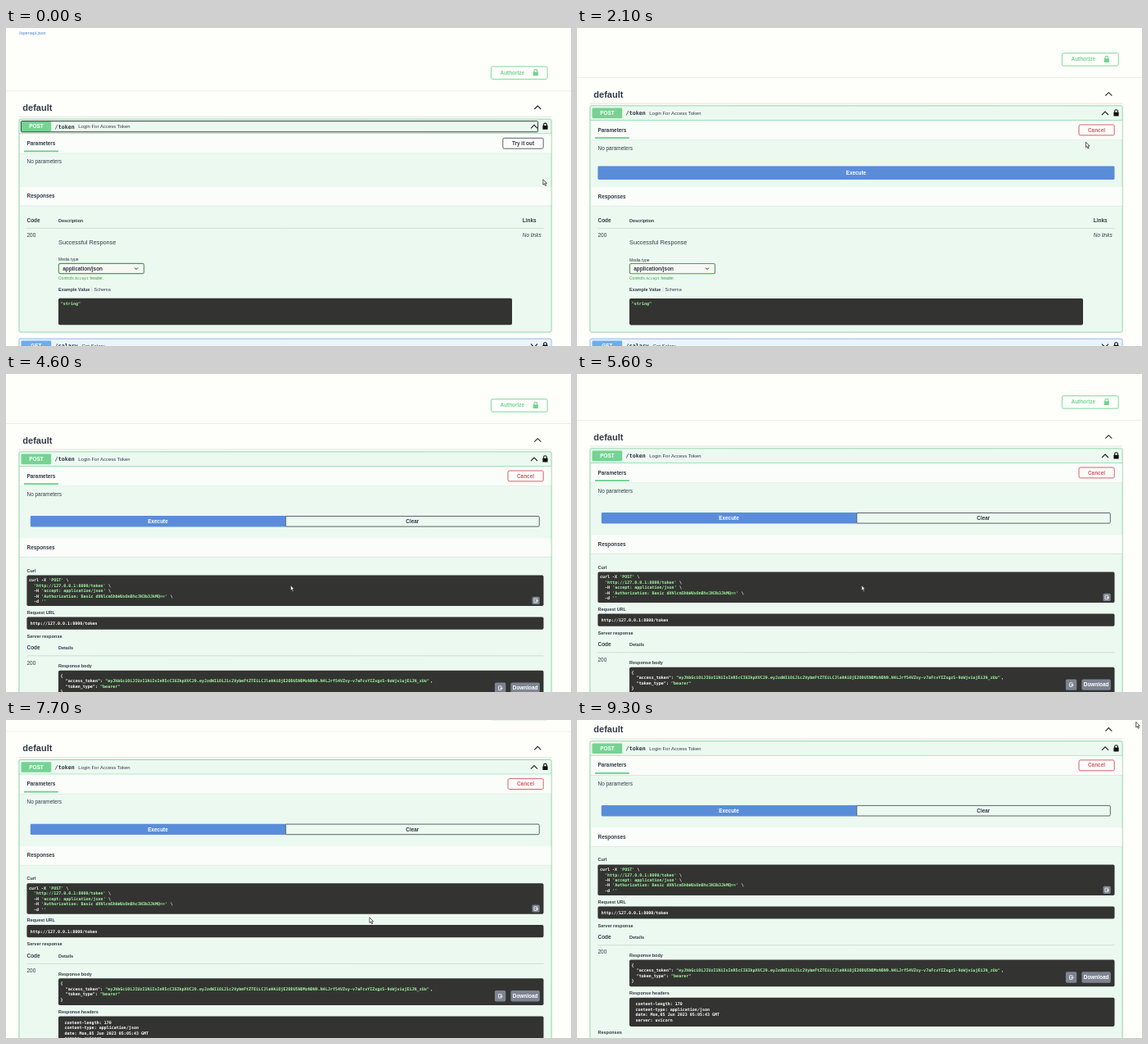
Write an HTML page with a canvas that moves like this. It is 690x388 px and loops after 9600 ms.

```html
<!DOCTYPE html>
<html lang="en">
<head>
<meta charset="utf-8">
<title>API docs</title>
<style>
html, body { margin: 0; width: 100%; height: 100%; overflow: hidden; background: #fefefb; }
canvas { display: block; width: 690px; height: 388px; }
</style>
</head>
<body>
<canvas id="stage" width="690" height="388"></canvas>
<script>
const ctx = document.getElementById('stage').getContext('2d');
const LOOP = 9600, STEP = 100;
const SANS = '"Liberation Sans", Arial, sans-serif';
const MONO = '"DejaVu Sans Mono", monospace';
const INK = '#333a46', GREEN = '#76d392', BLUE = '#5a8dd9', CODE = '#333431', LIME = '#a4f8a4', GREY = '#7d8491';
const SMALL = 5.49, BASE = 6.41, CHAR = 3.03;

const JWT = 'eyJhbGciOiJIUzI1NiIsInR5cCI6IkpXVCJ9.eyJzdWIiOiJ1c2VybmFtZTEiLCJleHAiOjE2ODU5NDMzNDN9' +
  '.N4LJrf54VZsy-v7aFcvYIZxgzS-9oWjviujEiJN_zUo';

// time, scroll offset
const SCROLL = [[0, 0], [1600, 0], [1900, 16.3], [5200, 16.3], [5600, 20.3],
  [7600, 20.3], [7700, 62.7], [8000, 85.4]];

// time, x, y, shape (no shape: hidden)
const POINTER = [
  [0, 655.5, 184.3, 'arrow'], [300], [500, 640, 132, 'arrow'], [800, 621, 138.8, 'hand'],
  [1800, 621, 138.8, 'arrow'], [2400, 621, 138.8, 'arrow'], [3000, 344, 178, 'hand'],
  [3300, 344, 178, 'ban'], [3600, 344, 178, 'arrow'], [4000, 347, 257.3, 'arrow'],
  [5600, 347, 257.3, 'arrow'], [6100, 683, 60, 'arrow'], [6200], [6400, 675, 4.3, 'arrow'],
  [7000, 682.5, 5, 'arrow'], [7100, 682.5, 5, 'arrow'], [7400, 443.6, 240.5, 'arrow'],
  [8100, 443.6, 240.5, 'arrow'], [8600, 627, 47, 'arrow'], [8900, 660, 23, 'arrow'],
  [9000], [9200, 682.3, 1, 'arrow'], [9300, 682.3, 2, 'arrow']
];

const lerp = (a, b, p) => a + (b - a) * p;
const clamp = p => Math.max(0, Math.min(1, p));

function segment(keys, t) {
  let i = keys.length - 1;
  while (keys[i][0] > t) i--;
  const a = keys[i], b = keys[i + 1] || a;
  return [a, b, b === a ? 0 : (t - a[0]) / (b[0] - a[0])];
}

function mix(a, b, p) {
  return `rgb(${a.map((v, i) => Math.round(lerp(v, b[i], p))).join(',')})`;
}

function text(str, x, y, size = BASE, { color = INK, style = '', font = SANS, align = 'left' } = {}) {
  ctx.font = `${style} ${size}px ${font}`;
  ctx.fillStyle = color;
  ctx.textAlign = align;
  ctx.fillText(str, x, y + size * 0.35);
}

const bold = (str, x, y, size, opts) => text(str, x, y, size, { style: 'bold', ...opts });
const mono = (str, x, y, color = '#fff', advance = CHAR) =>
  bold(str, x, y, advance / 0.602, { color, font: MONO });

// Parts wrapped in backticks are highlighted
function code(str, x, y) {
  str.split('`').forEach((part, i) => {
    mono(part, x, y, i % 2 ? LIME : '#fff');
    x += part.length * CHAR;
  });
}

function rect(x1, y1, x2, y2, fill, r = 0) {
  ctx.beginPath();
  ctx.roundRect(x1, y1, x2 - x1, y2 - y1, r);
  ctx.fillStyle = fill;
  ctx.fill();
}

function frame(x1, y1, x2, y2, color, width = 0.95, r = 1.8) {
  ctx.beginPath();
  ctx.roundRect(x1, y1, x2 - x1, y2 - y1, r);
  ctx.strokeStyle = color;
  ctx.lineWidth = width;
  ctx.stroke();
}

function path(points, color, width) {
  ctx.beginPath();
  points.forEach(([x, y]) => ctx.lineTo(x, y));
  ctx.strokeStyle = color;
  ctx.lineWidth = width;
  ctx.stroke();
}

const rule = (x1, x2, y, color, width = 0.6) => path([[x1, y], [x2, y]], color, width);

function chevron(x, y, w = 4, h = 2, width = 1.1) {
  path([[x - w, y + h], [x, y - h], [x + w, y + h]], '#222', width);
}

function lock(x, y, color) {
  rect(x - 3.1, y - 0.8, x + 3.1, y + 4, color, 0.6);
  ctx.beginPath();
  ctx.arc(x, y - 1.8, 1.9, Math.PI, 0);
  ctx.lineTo(x + 1.9, y);
  ctx.moveTo(x - 1.9, y - 1.8);
  ctx.lineTo(x - 1.9, y);
  ctx.strokeStyle = color;
  ctx.lineWidth = 1.1;
  ctx.stroke();
}

function band(y1, y2) {
  rect(17, y2, 665.5, y2 + 0.8, 'rgba(0,0,0,.07)');
  rect(17, y1, 665.5, y2, '#fbfdfa');
}

function block(y1, y2, fill, edge) {
  ctx.save();
  ctx.shadowColor = 'rgba(0,0,0,.19)';
  ctx.shadowBlur = 2;
  rect(16, y1, 666, y2, fill, 1.8);
  ctx.restore();
  frame(16, y1, 666, y2, edge, 0.8);
}

function summary(y, verb, color, route, label, labelX) {
  rect(18.5, y - 6.3, 55.2, y + 6.3, color, 1.4);
  bold(verb, 36.9, y, BASE, { color: '#fff', align: 'center' });
  mono(route, 59.6, y, '#30353f', 4.03);
  text(label, labelX, y, 5.95);
  lock(658.5, y - 0.4, '#111');
}

function pageTop() {
  bold('g', 52, -8.3, 16);
  text('/openapi.json', 16, 6.2, SMALL, { color: '#4a86c8' });
  frame(592.4, 47, 661.2, 62.4, '#7bd998', 1);
  bold('Authorize', 603.5, 54.5, BASE, { color: '#72d391' });
  lock(646.8, 54.3, '#72d391');
  rule(0, 690, 76.8, '#e3e5e1');
  bold('default', 20.3, 97, 11);
  chevron(649.3, 97);
  rule(16, 666, 108.4, '#cfd2ce');
}

function tryButton(t) {
  if (t < 1200) {
    frame(606.8, 134.3, 656.2, 147.2, '#555b62');
    bold('Try it out', 631.5, 140.6, BASE, { align: 'center' });
    return;
  }
  const color = mix([65, 70, 78], [217, 88, 98], clamp((t - 1200) / 300));
  frame(613, 134.3, 656.2, 147.2, color);
  bold('Cancel', 634.5, 140.6, BASE, { color, align: 'center' });
}

function operation(t, bottom) {
  block(111.2, bottom, '#ecf9f1', '#7fd59b');
  rule(16, 666, 128.8, '#7fd59b', 0.7);
  summary(120.2, 'POST', GREEN, '/token', 'Login For Access Token', 88.3);
  chevron(645, 120.3);
  if (t < 1000) {
    frame(18.4, 113.6, 649.6, 126.8, '#2b4436', 1, 1);
  }
  band(129.2, 152.5);
  bold('Parameters', 25.5, 140.6);
  rect(22, 149.5, 63.8, 151.2, '#62cf89');
  tryButton(t);
  text('No parameters', 25.5, 162.7);
}

function executeBar(t) {
  rect(25.4, 184.8, 656.5, 201.2, t < 3000 ? BLUE : '#6896da', 1.4);
  bold('Execute', 340.9, 193, BASE, { color: '#fff', align: 'center' });
}

function spinner(t) {
  const x = 341.7, y = 236, r = 14, turn = (t - 3300) / 1000 * Math.PI * 2;
  const ring = (from, to, color) => {
    ctx.beginPath();
    ctx.arc(x, y, r, from, to);
    ctx.strokeStyle = color;
    ctx.lineWidth = 0.9;
    ctx.stroke();
  };
  ring(0, Math.PI * 2, 'rgba(85,85,85,.15)');
  ring(turn - Math.PI * 0.75, turn - Math.PI * 0.2, 'rgba(0,0,0,.6)');
  bold('LOADING', x - 0.8, y - 0.5, 4.6, { align: 'center' });
}

function schemaPanel(shift) {
  ctx.save();
  ctx.translate(0, shift);
  band(194, 216.6);
  bold('Responses', 25.5, 205.2);
  bold('Code', 25.5, 235);
  bold('Description', 64, 235, SMALL);
  bold('Links', 630.8, 235);
  rule(25.4, 656.4, 244.3, '#bccac1');
  text('200', 25.5, 253);
  text('No links', 630.8, 253, BASE, { style: 'italic' });
  text('Successful Response', 64, 261, 7.32);
  text('Media type', 64, 282.7, 5.03);
  rect(64, 287.2, 168.8, 299.8, '#f5f8f3', 1.8);
  frame(64.4, 287.4, 168.5, 299.6, '#4b9c4c', 1.1);
  bold('application/json', 69.2, 293.5);
  path([[157, 292.5], [159, 294.5], [161, 292.5]], '#222', 1);
  const green = { color: '#3f9a4b' };
  text('Controls', 64, 305.2, 5.03, green);
  text('Accept', 84.2, 305.2, 4.6, { ...green, font: MONO });
  text('header.', 102.4, 305.2, 5.03, green);
  bold('Example Value', 64, 319, SMALL);
  path([[104.8, 316], [104.8, 322]], '#b9c5bd', 0.5);
  text('Schema', 107.6, 319, SMALL);
  rect(64, 329.8, 618, 362.3, CODE, 1.8);
  code('`"string"`', 66.8, 336);
  block(379.2, 398, '#ebf3fb', '#84b9ee');
  summary(387.8, 'GET', '#6aaef0', '/salary', 'Get Salary', 92.4);
  chevron(645, 387.5, 4, -2);
  ctx.restore();
}

function copyButton(x, y, half) {
  rect(x - half, y - half, x + half, y + half, GREY, 1.6);
  frame(x - 2.1, y - 2.2, x + 1.5, y + 2.4, '#fff', 0.8, 0.4);
  rule(x - 0.4, x + 2.8, y + 0.4, '#fff', 0.9);
}

function resultPanel() {
  rect(29.8, 189.4, 341.5, 202.8, BLUE, [1.4, 0, 0, 1.4]);
  frame(341.7, 189.8, 651.3, 202.4, '#555c62', 0.95, [0, 1.4, 1.4, 0]);
  bold('Execute', 185.5, 196.2, BASE, { color: '#fff', align: 'center' });
  bold('Clear', 496.3, 196.2, BASE, { align: 'center' });
  band(216.6, 239.4);
  bold('Responses', 25.5, 227.9);

  bold('Curl', 25.5, 255.9, SMALL);
  rect(25.4, 261.9, 656.5, 299.4, CODE, 1.8);
  ["curl -X `'POST'` \\",
    "  `'http://127.0.0.1:8000/token'` \\",
    "  -H `'accept: application/json'` \\",
    "  -H `'Authorization: Basic dXNlcm5hbWUxOnBhc3N3b3JkMQ=='` \\",
    "  -d `''`"
  ].forEach((line, i) => code(line, 28, 267.8 + i * 6.42));
  copyButton(647.1, 292.7, 4.6);

  bold('Request URL', 25.5, 307, SMALL);
  rect(25.4, 312.8, 656.5, 328, CODE, 1.8);
  code('http://127.0.0.1:8000/token', 29.8, 320.5);

  bold('Server response', 25.5, 336, SMALL);
  bold('Code', 25.5, 350.5);
  bold('Details', 64, 350.5, SMALL);
  rule(25.4, 656.4, 360.1, '#bccac1');
  text('200', 25.5, 368.6);

  bold('Response body', 64, 372.4, SMALL);
  rect(64, 378, 656.5, 410.7, CODE, 1.8);
  ['{',
    '  "access_token": `"' + JWT + '"`,',
    '  "token_type": `"bearer"`',
    '}'
  ].forEach((line, i) => code(line, 66.6, 384.4 + i * 6.42));
  copyButton(603.6, 399.4, 6.7);
  rect(616.4, 392.7, 651.8, 406.1, GREY, 1.8);
  bold('Download', 634.1, 399.4, BASE, { color: '#fff', align: 'center' });

  bold('Response headers', 64, 418.6, SMALL);
  rect(64, 424.2, 656.5, 459.3, CODE, 1.8);
  ['content-length: 170',
    'content-type: application/json',
    'date: Mon,05 Jun 2023 05:05:43 GMT',
    'server: uvicorn'
  ].forEach((line, i) => code(line, 71.4, 432 + i * 6.42));
  bold('Responses', 25.5, 466.5, SMALL);
}

function outlined(shape) {
  ctx.lineJoin = 'round';
  ctx.fillStyle = '#fff';
  ctx.strokeStyle = '#333';
  ctx.lineWidth = 0.8;
  ctx.fill(shape);
  ctx.stroke(shape);
  ctx.lineJoin = 'miter';
}

const SHAPES = {
  arrow: () => outlined(new Path2D('M.4 .4V7L1.9 5.6 3 8.2 4.2 7.7 3.1 5.2H5Z')),
  hand: () => outlined(new Path2D('M-.8 5V.8Q0 -.2 .8 .8V3.4L3.6 4.2Q4.4 4.6 4.1 6L3.3 9H-.8L-3 6Q-3 4.6 -1.8 5.2Z')),
  ban() {
    ctx.beginPath();
    ctx.arc(0, 0, 2.7, 0, Math.PI * 2);
    ctx.fillStyle = '#fff';
    ctx.fill();
    ctx.strokeStyle = '#b3202f';
    ctx.lineWidth = 1.2;
    ctx.stroke();
    path([[-1.9, -1.9], [1.9, 1.9]], '#b3202f', 1.2);
  }
};

function pointer(t) {
  const [a, b, p] = segment(POINTER, t);
  if (!a[3]) return;
  const end = b[3] ? b : a;
  ctx.save();
  ctx.translate(lerp(a[1], end[1], p), lerp(a[2], end[2], p));
  SHAPES[a[3]]();
  ctx.restore();
}

function draw(t) {
  const [a, b, p] = segment(SCROLL, t);
  const loading = t >= 3300 && t < 3600, done = t >= 3600;
  const shift = t < 1200 ? 0 : loading ? 69.2 : 16.4;
  ctx.fillStyle = '#fefefb';
  ctx.fillRect(0, 0, 690, 388);
  ctx.save();
  ctx.translate(0, -lerp(a[1], b[1], p));
  pageTop();
  operation(t, done ? 640 : 371 + shift);
  if (done) {
    resultPanel();
  } else {
    if (t >= 1200) executeBar(t);
    if (loading) spinner(t);
    schemaPanel(shift);
  }
  ctx.restore();
  pointer(t);
}

const start = performance.now();
function tick() {
  const t = (performance.now() - start) % LOOP;
  draw(Math.floor(t / STEP) * STEP);
  requestAnimationFrame(tick);
}
tick();
</script>
</body>
</html>
```
